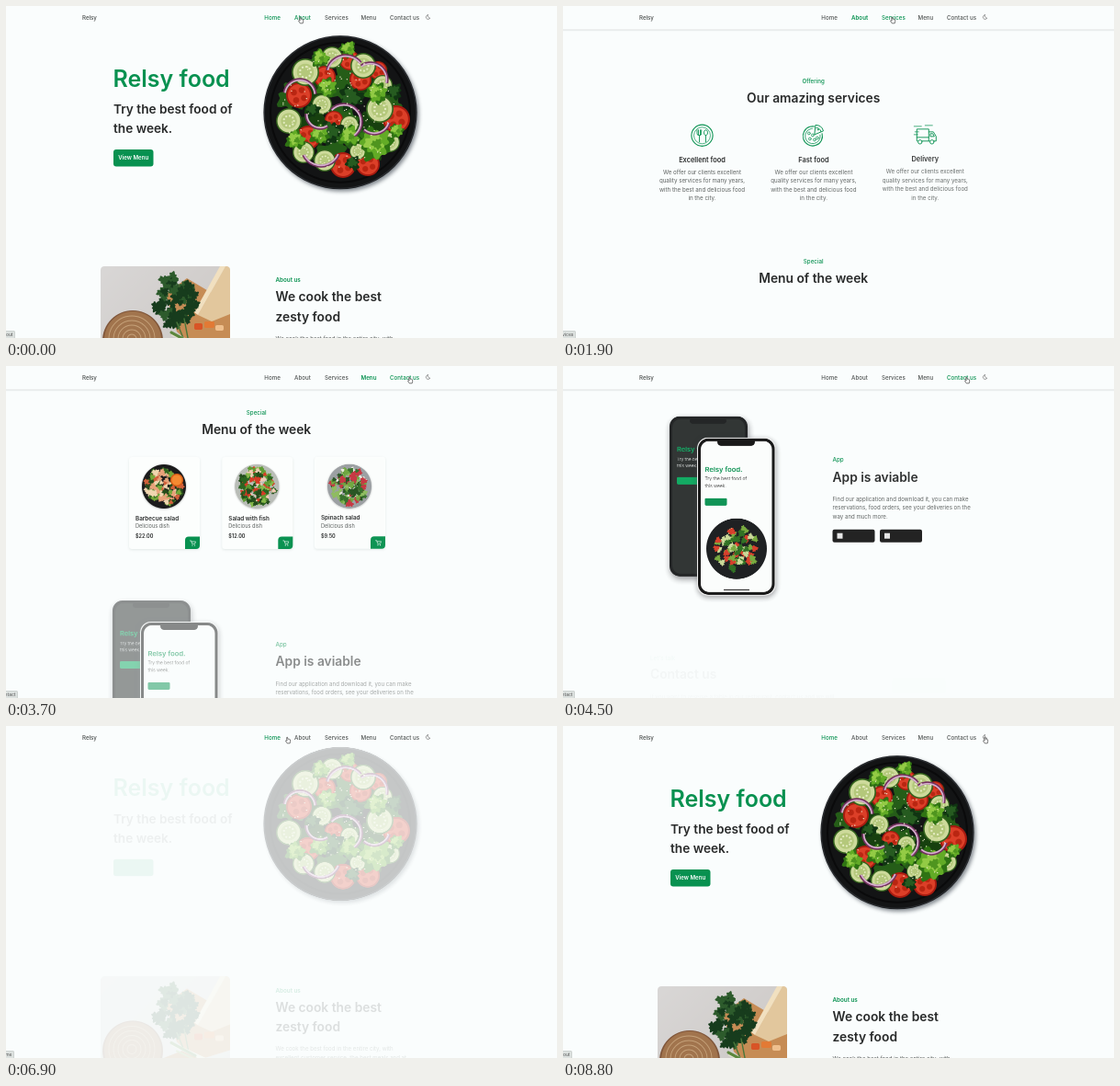
These frames come from a looping animation (600x361 px, 8.9 s). An HTML page with a canvas:

```html
<!DOCTYPE html>
<html lang="en">
<head>
<meta charset="utf-8">
<title>Restaurant page</title>
<style>
html, body { margin: 0; width: 100%; height: 100%; overflow: hidden; background: #fafdfd; }
canvas { display: block; width: 600px; height: 361px; }
</style>
</head>
<body>
<canvas id="stage"></canvas>
<script>
const W = 600, H = 361, LOOP = 8900, TAU = Math.PI * 2;
const BG = '#fafdfd', GREEN = '#089150', DARK = '#282a2a', TEXT = '#5c605f';
const FONT = 'Inter, "Open Sans", sans-serif';
const canvas = document.getElementById('stage');
const dpr = window.devicePixelRatio || 1;
canvas.width = W * dpr;
canvas.height = H * dpr;
const screen2d = canvas.getContext('2d');
let g = screen2d;

// ---------- drawing helpers ----------
function text(s, x, y, size, color = TEXT, weight = 400, align = 'left') {
  g.font = `${weight} ${size}px ${FONT}`;
  g.textAlign = align;
  g.fillStyle = color;
  g.fillText(s, x, y + size * 0.35);
}
function lines(list, x, y, step, size, color, weight, align) {
  list.forEach((s, i) => text(s, x, y + i * step, size, color, weight, align));
}
function box(x, y, w, h, r, color) {
  g.fillStyle = color;
  g.beginPath();
  g.roundRect(x, y, w, h, r);
  g.fill();
}
function disc(x, y, r, color) {
  g.fillStyle = color;
  g.beginPath();
  g.arc(x, y, r, 0, TAU);
  g.fill();
}
function ring(x, y, r, color, width = 1, a = 0, b = TAU) {
  g.strokeStyle = color;
  g.lineWidth = width;
  g.beginPath();
  g.arc(x, y, r, a, b);
  g.stroke();
}
function poly(pts, color) {
  g.fillStyle = color;
  g.beginPath();
  pts.forEach(([x, y]) => g.lineTo(x, y));
  g.closePath();
  g.fill();
}
function path(d, color, width, fill) {
  const p = new Path2D(d);
  if (fill) { g.fillStyle = fill; g.fill(p); }
  if (width) {
    g.strokeStyle = color;
    g.lineWidth = width;
    g.lineCap = g.lineJoin = 'round';
    g.stroke(p);
  }
}
function shadow(color, blur, dx = 0, dy = 0) {
  g.shadowColor = color;
  g.shadowBlur = blur;
  g.shadowOffsetX = dx;
  g.shadowOffsetY = dy;
}
function at(x, y, fn, scale = 1) {
  g.save();
  g.translate(x, y);
  g.scale(scale, scale);
  fn();
  g.restore();
}
function button(label, x, y, w, h) {
  box(x, y, w, h, 3, GREEN);
  text(label, x + w / 2, y + h / 2, 6.1, '#fff', 600, 'center');
}
function random(seed) {
  return () => (seed = seed * 16807 % 2147483647) / 2147483647;
}

// Paints once off screen; returns a function that places the result.
function sprite(x, y, w, h, fn) {
  const c = document.createElement('canvas'), k = 2 * dpr;
  c.width = w * k;
  c.height = h * k;
  const keep = g;
  g = c.getContext('2d');
  g.scale(k, k);
  g.translate(-x, -y);
  fn();
  g = keep;
  return () => g.drawImage(c, x, y, w, h);
}

// ---------- food ----------
function leaf(x, y, r, color, rnd) {
  const phase = rnd() * TAU;
  g.fillStyle = color;
  g.beginPath();
  for (let i = 0; i < 40; i++) {
    const a = i / 40 * TAU;
    const d = r * (0.78 + 0.16 * Math.sin(a * 3 + phase) + 0.13 * Math.sin(a * 8 + phase * 2));
    g.lineTo(x + Math.cos(a) * d, y + Math.sin(a) * d);
  }
  g.fill();
}
function frill(x, y, r, rnd) {
  leaf(x, y, r * 1.1, '#2f7313', rnd);
  leaf(x + 1, y - 1, r * 0.95, '#62ab26', rnd);
  leaf(x - 1, y - 2, r * 0.65, '#93cb45', rnd);
  leaf(x + 2, y, r * 0.35, '#4f951f', rnd);
}
function cucumber(x, y, r) {
  disc(x, y, r, '#34631d');
  disc(x, y, r * 0.89, '#cdda9b');
  disc(x, y, r * 0.62, '#b4c87b');
  for (let i = 0; i < 9; i++) {
    const a = i / 9 * TAU;
    disc(x + Math.cos(a) * r * 0.4, y + Math.sin(a) * r * 0.4, r * 0.08, '#e3ebc0');
  }
}
function tomato(x, y, r) {
  disc(x, y, r, '#a81b10');
  disc(x, y, r * 0.86, '#dc3f28');
  for (let i = 0; i < 4; i++) {
    const a = i / 4 * TAU + 0.5;
    disc(x + Math.cos(a) * r * 0.45, y + Math.sin(a) * r * 0.45, r * 0.24, '#b92612');
  }
}
function onion(x, y, r, a, b) {
  ring(x, y, r, '#73305f', 3.4, a, b);
  ring(x, y, r - 0.7, '#d5b0ce', 1.7, a, b);
}

const plate = sprite(268, 20, 192, 196, () => {
  const rnd = random(41);
  shadow('rgba(40,50,60,.55)', 9, 4, 5);
  disc(364, 115.7, 83.6, '#131415');
  shadow('transparent', 0);
  ring(364, 115.7, 82.6, '#2a2d31', 1.2);
  ring(364, 115.7, 76, '#0a0a0b', 2);
  [[312, 98, 19], [338, 88, 22], [372, 83, 27], [403, 85, 22], [416, 114, 22], [400, 135, 26],
   [365, 132, 30], [333, 130, 25], [356, 160, 22], [393, 160, 20], [344, 60, 14]]
    .forEach(([x, y, r], i) => leaf(x, y, r, i % 2 ? '#17400f' : '#255d18', rnd));
  [[319, 97, 14], [347, 77, 12], [374, 59, 11], [405, 70, 10], [386, 80, 12], [425, 123, 15],
   [367, 173, 14], [394, 172, 13], [329, 143, 13], [357, 124, 10]]
    .forEach(a => tomato(...a));
  [[326, 72, 15], [355, 56, 12], [389, 65, 14], [308, 125, 14], [324, 159, 12], [407, 112, 15],
   [418, 148, 11], [347, 168, 12], [410, 86, 11], [344, 107, 11], [374, 129, 10], [383, 158, 9]]
    .forEach(a => cucumber(...a));
  [[376, 100, 16], [354, 137, 15], [423, 93, 10], [334, 113, 9], [378, 171, 9]]
    .forEach(([x, y, r]) => {
      leaf(x, y, r, '#103512', rnd);
      leaf(x - 1, y - 1, r * 0.7, '#265b20', rnd);
    });
  [[342, 57, 10], [372, 47, 9], [403, 95, 12], [315, 146, 11], [341, 140, 11], [402, 150, 19],
   [374, 142, 12], [349, 89, 11], [425, 136, 8]]
    .forEach(a => frill(...a, rnd));
  onion(320, 97, 17, 3.3, 6.2);
  onion(370, 75, 21, 3.4, 5.6);
  onion(397, 80, 18, 4.1, 6.5);
  onion(368, 126, 19, 3.9, 7.2);
  onion(343, 153, 21, 0.4, 2.7);
  onion(401, 122, 17, 0.3, 2.3);
  onion(342, 118, 15, 1, 3.2);
  for (let i = 0; i < 110; i++) {
    const a = rnd() * TAU, d = Math.sqrt(rnd()) * 63;
    disc(364 + Math.cos(a) * d, 115 + Math.sin(a) * d, 0.65, '#f7eed1');
  }
});

const photo = sprite(103, 283, 141, 141, () => {
  const rnd = random(77);
  g.beginPath();
  g.roundRect(103, 283, 141, 141, 4);
  g.clip();
  g.translate(0, 236);
  const bg = g.createLinearGradient(103, 47, 244, 187);
  bg.addColorStop(0, '#d9d7d6');
  bg.addColorStop(1, '#c9c4c1');
  g.fillStyle = bg;
  g.fillRect(103, 47, 141, 141);
  poly([[174, 77], [197, 60], [244, 88], [244, 127], [208, 138], [186, 118]], '#c68c55');
  poly([[140, 148], [196, 126], [216, 139], [160, 162]], '#b47840');
  poly([[209, 100], [239, 47], [244, 47], [244, 99], [224, 107]], '#e2c79d');
  poly([[209, 100], [239, 47], [233, 47], [205, 97]], '#f1e0c0');
  box(205, 109, 9, 7, 2, '#d85426');
  box(216, 107, 11, 7, 2, '#e27a35');
  box(228, 111, 9, 6, 2, '#efbf8d');
  disc(138, 128, 33, '#80563a');
  disc(138, 127, 31, '#a1744d');
  for (let r = 5; r < 30; r += 5) ring(137, 126, r, '#c6a27a', 0.9);
  for (let i = 0; i < 60; i++) {
    const a = rnd() * TAU, d = Math.sqrt(rnd());
    leaf(184 + Math.cos(a) * d * 23, 84 + Math.sin(a) * d * 28, 4 + rnd() * 4, i % 3 ? '#173c1d' : '#2d5b2c', rnd);
  }
  path('M194 104L199 130M186 108L193 125', '#49763a', 1.4);
  path('M182 121L244 150', '#e5e5cf', 4);
  path('M186 128L240 153', '#93ad62', 2);
  path('M180 119L206 133', '#5c873d', 3);
  path('M134 187L151 167', '#2b2320', 4);
  path('M150 168L174 148', '#7d8285', 3);
  for (let i = 0; i < 11; i++) {
    const x = 178 + (i % 5) * 8 + rnd() * 2, y = 143 + (i / 5 | 0) * 6 + (i % 2) * 3;
    disc(x, y, 4.6, '#b92518');
    disc(x - 1, y - 1, 2.8, '#e6502f');
  }
  for (let i = 0; i < 9; i++) leaf(158 + rnd() * 24, 162 + rnd() * 18, 6, i % 2 ? '#244f25' : '#477a38', rnd);
  [[222, 169, 10], [201, 179, 11]].forEach(([x, y, r]) => {
    disc(x, y, r, '#8a465f');
    disc(x, y, r - 1.5, '#e7ccd2');
    ring(x, y, r * 0.55, '#bb829a', 1.2);
    disc(x, y, 2, '#b77891');
  });
});

function bowl(x, seed, rim, colors, garnish) {
  return sprite(x - 28, 733, 56, 60, () => {
    const rnd = random(seed);
    shadow('rgba(0,0,0,.3)', 4, 0, 1);
    disc(x, 763, 24, rim);
    shadow('transparent', 0);
    for (let i = 0; i < 110; i++) {
      const a = rnd() * TAU, d = Math.sqrt(rnd()) * 19;
      leaf(x + Math.cos(a) * d, 763 + Math.sin(a) * d, 2 + rnd() * 3, colors[rnd() * colors.length | 0], rnd);
    }
    if (garnish) {
      disc(x + 14, 756, 7, '#d95c16');
      disc(x + 14, 756, 5.6, '#f58a31');
    }
  });
}
const dishes = [
  ['Barbecue salad', '$22.00', 172, bowl(172, 12, '#1b1b1c', ['#31671f', '#75a83a', '#e8a27a', '#d1603b', '#f0d6b0', '#254b1a'], true)],
  ['Salad with fish', '$12.00', 273.3, bowl(273.3, 25, '#b9bdb7', ['#2a6420', '#5d9b33', '#d43b25', '#f0cbb6', '#86b84a', '#234c1b'])],
  ['Spinach salad', '$9.50', 374, bowl(374, 39, '#9a9ea1', ['#356f29', '#6da63e', '#255320', '#c63540', '#e9e8dd', '#8dbb5e'])]
];

const phones = sprite(100, 880, 150, 224, () => {
  shadow('rgba(60,60,65,.55)', 14, 2, 6);
  box(116, 893, 85, 174, 11, '#1d1f20');
  shadow('transparent', 0);
  box(119, 896, 79, 168, 9, '#2b2f2e');
  box(138, 895, 40, 6, 3, '#1d1f20');
  text('Relsy food.', 124, 929, 7.4, '#0bb265', 600);
  lines(['Try the best food of', 'this week.'], 124, 940, 7, 4.7, '#c8cccb');
  box(124, 959, 24, 8, 1.5, '#0ba85e');
  shadow('rgba(60,60,65,.5)', 12, 1, 4);
  box(146, 916, 85.5, 172, 12, '#f0f0f0');
  shadow('transparent', 0);
  box(147, 917, 83.5, 170, 11.5, '#111');
  box(150, 920, 77.5, 164, 9, '#fbfdfc');
  box(168, 917, 41, 8, 4, '#111');
  text('Relsy food.', 154.5, 951, 7.6, GREEN, 600);
  lines(['Try the best food of', 'this week.'], 154.5, 961, 8, 4.9, '#555');
  box(154.5, 982, 24, 8, 1.5, GREEN);
  disc(189, 1037, 33, '#17191b');
  const rnd = random(8);
  for (let i = 0; i < 65; i++) {
    const a = rnd() * TAU, d = Math.sqrt(rnd()) * 23;
    leaf(189 + Math.cos(a) * d, 1037 + Math.sin(a) * d, 4,
      ['#2b6d1e', '#75a83a', '#d63a25', '#c9d996'][i % 4], rnd);
  }
  box(175, 1081, 28, 1.4, 0.7, '#222');
});

// ---------- motion ----------
const clamp = v => Math.max(0, Math.min(1, v));
const smooth = v => v * v * (3 - 2 * v);

function settle(x) { // cubic-bezier(.5, 0, 0, 1)
  if (x >= 1) return 1;
  let lo = 0, hi = 1;
  for (let i = 0; i < 18; i++) {
    const m = (lo + hi) / 2;
    if (1.5 * m * (1 - m) ** 2 + m ** 3 < x) lo = m; else hi = m;
  }
  return smooth(lo);
}
// Keys are [start, end, value]; the value is eased in over that span.
function track(keys, first, t) {
  return keys.reduce((v, [a, b, to]) => v + (to - v) * smooth(clamp((t - a) / (b - a))), first);
}
const SCROLL = [[60, 620, 236], [1450, 2050, 436], [2830, 3400, 632], [4150, 4850, 1042], [6000, 6750, 0]];
const CURSOR = [[600, 950, 359], [2150, 2600, 397], [3350, 3620, 440], [4900, 5500, 292], [6800, 7350, 460]];
const TIPS = [[0, 'out', 10], [820, 'vices', 14], [2380, 'nu', 9], [3480, 'ntact', 13], [5000, '', 0],
  [5800, 'me', 9], [6930, 'out', 10]];

let now = 0;
function reveal(on, off, fn) {
  const age = (now - on + LOOP) % LOOP;
  if (age > (off - on + LOOP) % LOOP) return;
  const p = settle(age / 2000);
  g.save();
  g.globalAlpha = p;
  g.translate(0, -12 * (1 - p));
  fn();
  g.restore();
}

// ---------- page ----------
function home() {
  reveal(6570, 560, () => {
    text('Relsy food', 116.5, 79, 25, GREEN, 600);
    lines(['Try the best food of', 'the week.'], 117, 112, 21, 13.65, DARK, 600);
    button('View Menu', 117, 156, 43.5, 18.5);
  });
  reveal(6400, 600, plate);
}
function about() {
  reveal(6480, 1950, photo);
  reveal(6460, 1950, () => {
    text('About us', 293.5, 298, 6.3, GREEN, 600);
    lines(['We cook the best', 'zesty food'], 293.5, 316.5, 21.3, 13.8, DARK, 600);
    lines(['We cook the best food in the entire city, with',
      'excellent customer service, the best meals and at',
      'the best price, visit us.'], 293.5, 361.5, 9.5, 6.1);
    button('Explore history', 293.5, 394.5, 54.5, 18.5);
  });
}
function heading(tag, title, y) {
  text(tag, 272.7, y, 6.2, GREEN, 500, 'center');
  text(title, 272.7, y + 18.5, 13.8, DARK, 600, 'center');
}
const icons = [
  () => {
    ring(0, 0, 11.6, GREEN, 1.1);
    ring(0, 0, 9, GREEN, 0.7);
    path('M-4 -6V-1M-2 -6V-1M-5.5 -6V-2Q-5.5 0 -3 0Q-.8 0 -.8 -2V-6M-3 0V7', GREEN, 0.9);
    path('M4 0V7M4 0C1.2 0 1.3 -6 4 -6S6.8 0 4 0', GREEN, 0.9);
  },
  () => {
    ring(-1, 1, 10.6, GREEN, 1.1, -0.3, 4.9);
    ring(-1, 1, 8.2, GREEN, 0.8, -0.2, 4.7);
    path('M1 -1L2 -11Q9 -11 10.5 -5ZM3 -8Q7 -8 8 -4', GREEN, 1);
    [[-5, -2], [-4, 4], [1, 5], [-1, 0], [4, 3]].forEach(([x, y]) => ring(x, y, 1.4, GREEN, 0.8));
    disc(5, -6, 0.9, GREEN);
  },
  () => {
    path('M-8 7H-9V-6H4V7H-3M4 -3H9L12 2V7H10M5 7H4M6 -1H8.5L10 2H6ZM-9 3H4', GREEN, 1);
    path('M-12 -9H-4M-11 -3H-7M-12 0H-8M0 -10H8', GREEN, 0.8);
    ring(-5.5, 8, 2.2, GREEN, 1);
    ring(7.5, 8, 2.2, GREEN, 1);
  }
];
function services() {
  heading('Offering', 'Our amazing services', 487);
  ['Excellent food', 'Fast food', 'Delivery'].forEach((name, i) => {
    const x = 151.5 + i * 121.4;
    reveal(200 + i * 260, 3250, () => {
      at(x, 546, icons[i]);
      text(name, x, 572.5, 7.4, DARK, 600, 'center');
      lines(['We offer our clients excellent', 'quality services for many years,',
        'with the best and delicious food', 'in the city.'], x, 586, 9.5, 6.2, TEXT, 400, 'center');
    });
  });
}
function menu() {
  heading('Special', 'Menu of the week', 683);
  dishes.forEach(([name, price, x, picture], i) => reveal(1840 + i * 170, 4700, () => {
    const left = x - 38;
    g.save();
    shadow('rgba(20,60,40,.1)', 3 * dpr, 0, dpr);
    box(left, 731, 77, 100, 3, '#fcfefd');
    g.restore();
    picture();
    text(name, left + 7, 797.5, 6.3, DARK, 600);
    text('Delicious dish', left + 7, 806.5, 5.6);
    text(price, left + 7, 817.5, 5.5, DARK, 600);
    box(left + 61, 817.5, 16, 13.5, [4, 0, 4, 0], GREEN);
    path(`M${left + 66.5} 822h1.2l1 3.4h3l.8-2.4h-4.4`, '#fff', 0.6);
    disc(left + 69, 827, 0.6, '#fff');
    disc(left + 71.5, 827, 0.6, '#fff');
  }));
}
function app() {
  reveal(3080, 6350, phones);
  reveal(3060, 6350, () => {
    text('App', 293.5, 940, 6.3, GREEN, 500);
    text('App is aviable', 293.5, 959, 13.8, DARK, 600);
    lines(['Find our application and download it, you can make',
      'reservations, food orders, see your deliveries on the',
      'way and much more.'], 293.5, 983, 9.5, 6.1);
    [293.5, 345].forEach(x => {
      box(x, 1016, 46, 14, 2, '#1b1b1b');
      box(x + 5, 1020, 6, 6, 0, '#eee');
    });
  });
}
function contact() {
  reveal(4250, 6280, () => {
    text("Let's talk", 95, 1167, 6.3, GREEN, 500);
    text('Contact us', 95, 1185, 13.8, DARK, 600);
    lines(['If you want to reserve a table in our restaurant, contact us and we will',
      'attend you quickly, with our 24/7 chat service.'], 95, 1209.5, 9.5, 6.1);
  });
  reveal(4380, 6280, () => button('Contact us now', 358, 1188, 59, 18.5));
}
function footer() {
  reveal(4450, 6250, () => {
    text('Relsy Food', 95, 1296.5, 7.9, GREEN, 600);
    text('Restaurant', 95, 1308, 5.4);
    [99.5, 115.8, 132].forEach(x => disc(x, 1327.3, 3.1, '#444847'));
  });
  [['Services', 'Delivery', 'Pricing', 'Fast food', 'Reserve your spot'],
   ['Information', 'Event', 'Contact us', 'Privacy policy', 'Terms of services'],
   ['Address', 'Norvale - Mirt', 'St Olden #100', '000 - 000 - 000', 'relsyfood@example.com']
  ].forEach(([title, ...items], i) => reveal([4620, 4950, 5290][i], 6250, () => {
    const x = 186 + i * 91.4;
    text(title, x, 1296.5, 9, DARK, 600);
    lines(items, x, 1314, 12.4, 6.1);
  }));
  text('© 2020 Pelmodesk. All right reserved', 273, 1387, 5.3, TEXT, 400, 'center');
}

const links = [['Home', 281.3, 299], ['About', 314, 332], ['Services', 347, 372], ['Menu', 386.5, 403], ['Contact us', 418, 450.5]];
function header(scroll, cursor) {
  const lifted = scroll >= 78;
  if (lifted) {
    g.save();
    shadow('rgba(0,0,0,.2)', 2 * dpr, 0, 0.7 * dpr);
    g.fillStyle = BG;
    g.fillRect(-4, -4, W + 8, 29.6);
    g.restore();
  }
  const active = scroll > 825 ? -1 : [217, 417, 613].filter(y => scroll > y).length;
  text('Relsy', 83, 12.5, 6.15, '#4a4e4d', 500);
  links.forEach(([name, a, b], i) => {
    const lit = i === active, hover = cursor >= a && cursor <= b;
    text(name, a, 12.5, 6.2, lit || hover ? GREEN : '#505453', lit && lifted ? 600 : 500);
  });
  at(459.5, 12, () => path('M-.3 -2.5A2.6 2.6 0 1 0 2.5 1.2A3 3 0 0 1 -.3 -2.5Z', '#555', 0.65), 0.9);
}
function hand(x, y) {
  at(x, y, () => path('M-1.6 -2.6Q-1.5 -3.7 -.6 -3.3L-.1 -1Q1.5 -1.3 3 -.2Q3.5 1.8 2.6 4.5H-.9L-2.9 1.5Q-3 .3 -1.4 1Z',
    '#333', 0.75, '#fff'), 0.85);
}
function tip() {
  const [, label, w] = TIPS.filter(([start]) => start <= now).pop();
  if (!label) return;
  box(-3, 353, w + 3, 10, 2, '#c0c5c3');
  box(-3, 353.5, w + 2.5, 10, 1.5, '#dce1df');
  text(label, w - 2.5, 357.3, 5, '#555', 400, 'right');
}

function frame() {
  now = performance.now() % LOOP;
  const scroll = track(SCROLL, 0, now), cursor = track(CURSOR, 321, now);
  g.setTransform(dpr, 0, 0, dpr, 0, 0);
  g.fillStyle = BG;
  g.fillRect(0, 0, W, H);
  g.save();
  g.translate(0, -scroll);
  [home, about, services, menu, app, contact, footer].forEach(part => part());
  g.restore();
  header(scroll, cursor);
  hand(cursor, 15);
  tip();
  requestAnimationFrame(frame);
}
frame();
</script>
</body>
</html>
```
